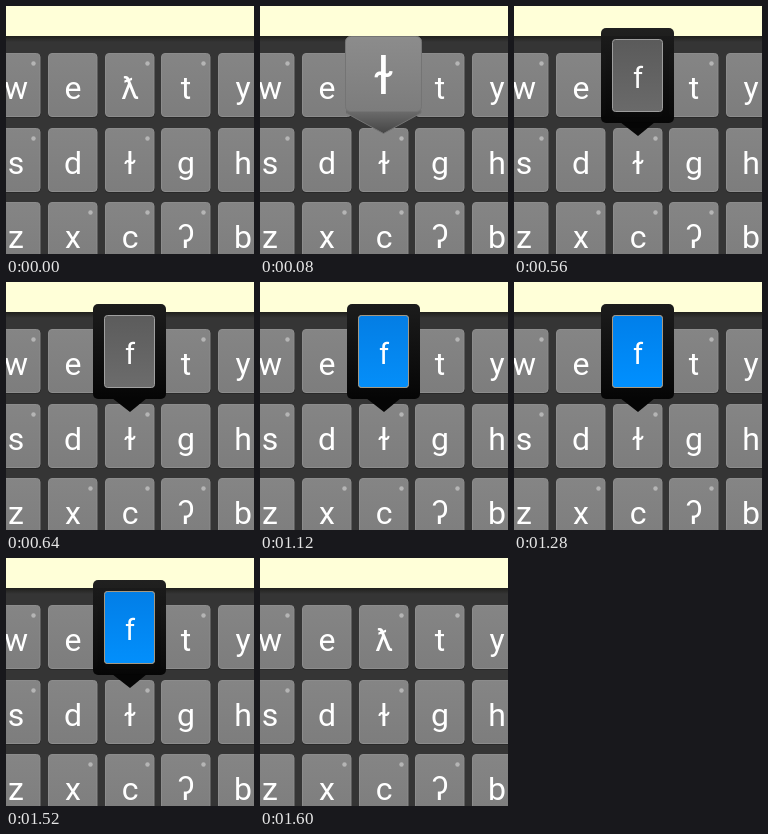
An HTML page with a canvas for the animation above (1.68 s loop, 248 px wide and 248 px high).

```html
<!DOCTYPE html>
<html lang="en">
<head>
<meta charset="utf-8">
<title>Keyboard long press</title>
<style>
html, body { margin: 0; width: 100%; height: 100%; overflow: hidden; background: #353535; }
canvas { display: block; }
</style>
</head>
<body>
<canvas id="stage" width="248" height="248"></canvas>
<script>
const ctx = document.getElementById('stage').getContext('2d');
const LOOP = 1680;
const ROWS = ['weƛty', 'sdɫgh', 'zxcʔb'];
const DOTTED = 'wƛtsɫxcʔ';

function shade(top, bottom, ...colors) {
  const g = ctx.createLinearGradient(0, top, 0, bottom);
  colors.forEach((c, i) => g.addColorStop(i / (colors.length - 1), c));
  return g;
}

function paint(fill, stroke) {
  ctx.fillStyle = fill;
  ctx.fill();
  if (stroke) {
    ctx.strokeStyle = stroke;
    ctx.stroke();
  }
}

function box(x, y, w, h, r, fill, stroke) {
  ctx.beginPath();
  ctx.roundRect(x, y, w, h, r);
  paint(fill, stroke);
}

function poly(fill, stroke, ...points) {
  ctx.beginPath();
  points.forEach(p => ctx.lineTo(...p));
  paint(fill, stroke);
}

function label(text, x, y, size) {
  ctx.font = `${size}px Roboto, "Noto Sans", sans-serif`;
  ctx.textAlign = 'center';
  ctx.fillStyle = '#fff';
  ctx.fillText(text, x, y);
}

function key(char, x, y) {
  box(x, y + 1, 49.5, 64, 4, '#292929');
  box(x + .5, y + .5, 48.5, 63, 3.5, shade(y, y + 64, '#858585', '#7d7d7d'), '#8c8c8c');
  label(char, x + 25, y + 46, 32);
  if (DOTTED.includes(char)) {
    ctx.beginPath();
    ctx.arc(x + 42.5, y + 10.5, 2.2, 0, 7);
    paint('#b5b5b5');
  }
}

function keyboard() {
  ctx.fillStyle = '#353535';
  ctx.fillRect(0, 0, 248, 248);
  ctx.fillStyle = '#ffffd8';
  ctx.fillRect(0, 0, 248, 30);
  ctx.fillStyle = shade(30, 36, '#20201c', '#353535');
  ctx.fillRect(0, 30, 248, 6);
  ROWS.forEach((row, r) =>
    [...row].forEach((char, c) =>
      key(char, Math.round(56.8 * c - 15), Math.round(47 + 74.6 * r))));
}

function preview() {
  poly(shade(105, 128, '#6c6c6c', '#444'), '#747474', [86, 104], [161, 104], [161, 107], [123.5, 127.5], [86, 107]);
  box(85.5, 30.5, 76, 75, 5, shade(30, 106, '#8c8c8c', '#7c7c7c'), '#747474');
  label('ɫ', 123.5, 88, 52);
}

function chooser(press, alpha) {
  ctx.globalAlpha = alpha;
  box(87, 22, 73, 95, 5, shade(22, 117, '#1c1c1c', '#050505'));
  poly('#050505', null, [106, 116], [141, 116], [124, 130]);
  box(98.5, 33.5, 50, 72, 3, shade(34, 106, '#5c5c5c', '#6c6c6c'), '#a0a0a0');
  ctx.globalAlpha = alpha * press;
  box(98.5, 33.5, 50, 72, 3, shade(34, 106, '#007fea', '#0090ff'), '#a89880');
  ctx.globalAlpha = alpha;
  label('f', 124, 82, 29);
  ctx.globalAlpha = 1;
}

function draw(now) {
  const t = now % LOOP;
  keyboard();
  if (t >= 80 && t < 560) preview();
  if (t >= 560 && t < 1600) {
    const press = t < 1120 ? 0 : t < 1200 ? .96 : t < 1280 ? .98 : 1;
    const alpha = t < 640 || t >= 1520 ? .98 : 1;
    chooser(press, alpha);
  }
}

const start = performance.now();
function tick() {
  draw(performance.now() - start);
  requestAnimationFrame(tick);
}
tick();
</script>
</body>
</html>
```
